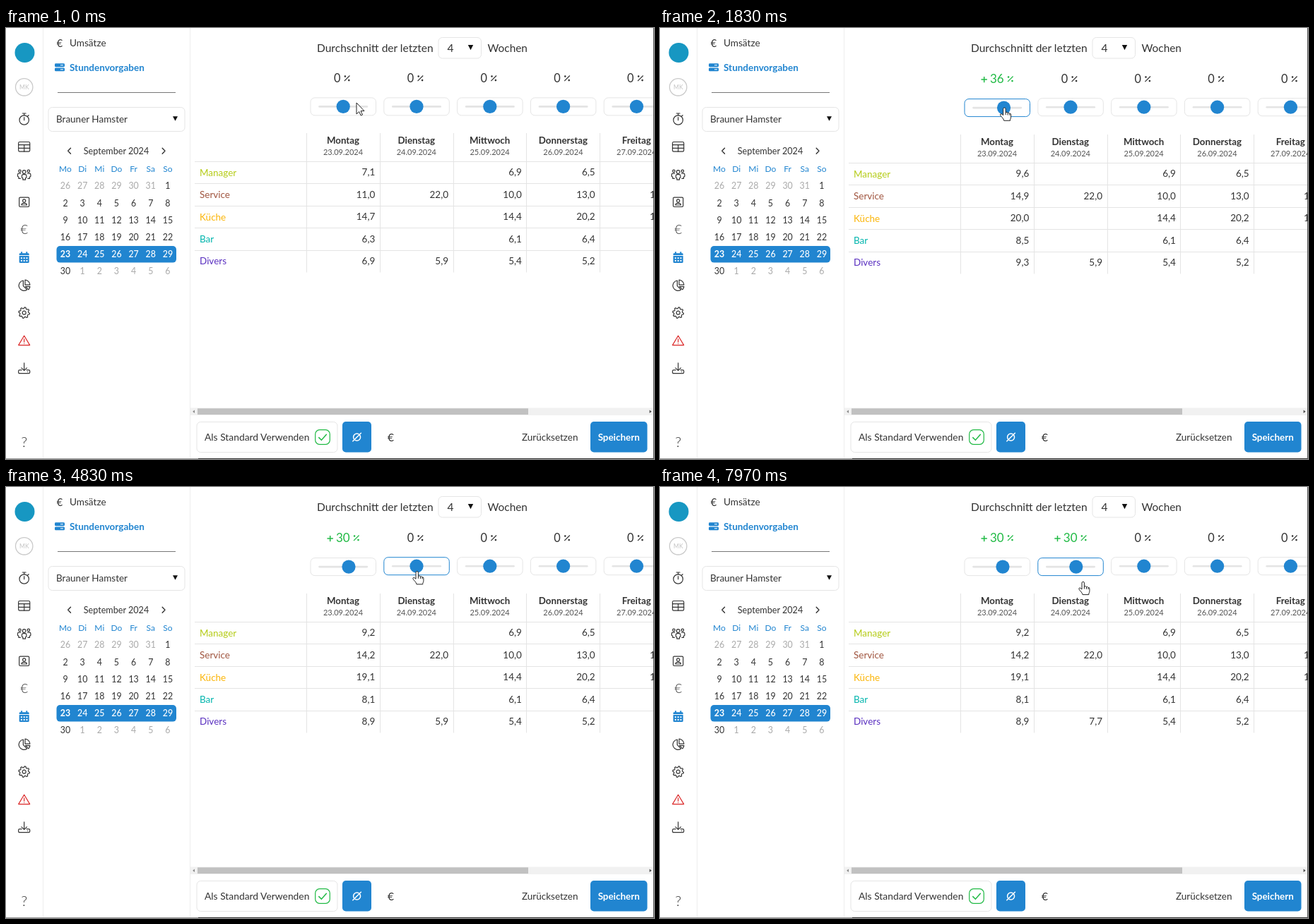
Write an HTML page that moves like this. It is 917 by 611 pixels and loops after 8 s.

```html
<!DOCTYPE html>
<html lang="de">
<head>
<meta charset="utf-8">
<title>Stundenvorgaben</title>
<style>
html, body { margin: 0; width: 100%; height: 100%; overflow: hidden; background: #fff; }
svg { display: block; }
text { font-family: Lato, "Open Sans", sans-serif; fill: #333; white-space: pre; }
.icon { fill: none; stroke: #333; stroke-width: 1.2; stroke-linecap: round; stroke-linejoin: round; }
.card { fill: #fff; stroke: #e5e5e5; }
.line { stroke: #e4e4e4; }
</style>
</head>
<body>
<svg id="stage" width="917" height="611" viewBox="0 0 917 611">
  <path class="line" d="M52.5 0V610M260.5 0V610" style="stroke:#eee"/>
  <circle cx="26.5" cy="35" r="14" fill="#1797c2"/>
  <circle cx="25.7" cy="83.8" r="12.2" fill="none" stroke="#c9c9c9" stroke-width="1.3"/>

  <g class="icon">
    <g transform="translate(25.7 129)"><circle cy="1.5" r="6.7"/><path d="M0-5.2V-8M-2.4-8H2.4M0-2.5V1.7M5-4l1.4-1.3"/></g>
    <g transform="translate(25.7 168.3)"><rect x="-8" y="-6.8" width="16" height="13.6" rx="1.6"/><path d="M-8-2.7H8M-8 2H8M0-2.7V6.8"/></g>
    <g transform="translate(25.7 208)"><circle cy="-4" r="2.3"/><circle cx="-6.2" cy="-5.2" r="1.7"/><circle cx="6.2" cy="-5.2" r="1.7"/>
      <path d="M-3.2 4V1.5Q-3.2-.3-1.5-.3H1.5Q3.2-.3 3.2 1.5V4L1.8 5V7.2H-1.8V5ZM-5-1.8H-7.5Q-9.2-1.8-9.2 0V2.2L-7.8 3.2V5.3H-5.2M5-1.8H7.5Q9.2-1.8 9.2 0V2.2L7.8 3.2V5.3H5.2"/></g>
    <g transform="translate(25.7 246.8)"><rect x="-7" y="-6.7" width="14" height="13.4" rx="1.4"/><circle cy="-1.8" r="2.1"/><path d="M-3.8 4.2Q-3.8 1.5 0 1.5T3.8 4.2Z"/></g>
    <g transform="translate(25.7 364.8)"><path d="M-1.3-6.8A7.2 7.2 0 1 0 4 6.1L-1.3.8ZM1.3-7.6A7.2 7.2 0 0 1 8.2-.7H1.3ZM1.8 1.8H8.2A7.2 7.2 0 0 1 6.2 6.1Z"/></g>
    <g transform="translate(25.7 403.7)"><circle r="2.5"/><path id="gear"/></g>
    <g transform="translate(25.7 443)" stroke="#db2828"><path d="M0-6.8L8 6.6H-8ZM0-2.2V2.2M0 4.3V4.4"/></g>
    <g transform="translate(25.7 482.5)"><path d="M0-7.6V3M-3.8-.6L0 3.2 3.8-.6M-3.5 2.4H-6.6Q-8 2.4-8 3.8V5.8Q-8 7.2-6.6 7.2H6.6Q8 7.2 8 5.8V3.8Q8 2.4 6.6 2.4H3.5M5 4.9H5.1"/></g>
    <path d="M91.5 170.3L87.7 174.3 91.5 178.3M221.2 170.3L225 174.3 221.2 178.3" style="stroke-width:1.4"/>
  </g>
  <g transform="translate(25.7 325.3)" fill="#2185d0">
    <path d="M-7-3.2V-4.6Q-7-6-5.6-6H5.6Q7-6 7-4.6V-3.2ZM-4.6-8h2v3h-2zM2.6-8h2v3h-2z"/>
    <path d="M-7-2.2H7V6.3Q7 7.8 5.6 7.8H-5.6Q-7 7.8-7 6.3Z"/>
    <path d="M-4.8 0h2v2h-2zM-1 0h2v2h-2zM2.8 0h2v2h-2zM-4.8 3.8h2v2h-2zM-1 3.8h2v2h-2zM2.8 3.8h2v2h-2z" fill="#fff"/>
  </g>
  <g fill="#2185d0"><rect x="69" y="50.3" width="14" height="4.9" rx="1.4"/><rect x="69" y="56.4" width="14" height="4.9" rx="1.4"/></g>
  <path d="M77 52.7H81M77 58.8H81" stroke="#fff"/>
  <path d="M73 91.5H240" stroke="#777"/>
  <rect class="card" x="60" y="112.5" width="193" height="34" rx="5.5"/>
  <rect class="card" x="612" y="13.5" width="60.5" height="29.5" rx="5.5"/>
  <path d="M236 125.2H243L239.5 131.8ZM653.8 24H661.2L657.5 31.2Z" fill="#111"/>
  <rect x="71.5" y="309" width="169.5" height="23.6" rx="5" fill="#2185d0"/>

  <g id="main"></g>

  <rect x="261" y="538.5" width="655" height="10.5" fill="#f1f1f1"/>
  <rect x="271" y="539.3" width="468" height="8.8" fill="#c1c1c1"/>
  <path d="M267 541.6V546L264.2 543.8Z" fill="#8a8a8a"/><path d="M910.6 541.6V546L913.6 543.8Z" fill="#444"/>
  <rect class="card" x="270" y="558.5" width="199" height="43" rx="5.5"/>
  <rect x="437.7" y="569.7" width="20.6" height="20.6" rx="6" fill="#fff" stroke="#21ba45" stroke-width="1.2"/>
  <path d="M442.8 580.6L446.4 584.2 453.4 576.2" fill="none" stroke="#21ba45" stroke-width="1.5" stroke-linecap="round"/>
  <rect x="476" y="558" width="41" height="43.5" rx="5" fill="#2185d0"/>
  <g fill="none" stroke="#fff" stroke-width="1.5" stroke-linecap="round"><circle cx="496.6" cy="580" r="5"/><path d="M490.8 585.8L502.4 574.2"/></g>
  <rect x="827" y="558" width="80.5" height="43.5" rx="5" fill="#2185d0"/>
  <g id="labels"></g>
  <path d="M0 610.5H272" stroke="#999"/><path d="M272 610.5H917" stroke="#333"/>
  <path d="M916.5 0V611" stroke="#555"/>
  <g id="cursor" fill="#fff" stroke="#222" stroke-linejoin="round">
    <path id="arrow" d="M0 0V16L3.7 12.6 6.2 18 8.5 17 6.1 11.6H11Z"/>
    <g id="hand">
      <path d="M-2 11V2A1.7 1.7 0 0 1 1.4 2V7Q3.8 6 4.4 7.6 6.4 7 7 8.5 8.9 8.1 8.9 10.3V13.5Q8.9 15.5 7.8 17V18.6H-1Q-1.4 16.2-3.6 14-5.8 12-6.2 10.4-6 8.4-4.2 9.2Z"/>
      <path d="M1.4 7V10.5M4.4 7.8V10.8M7 8.7V11" fill="none"/>
    </g>
  </g>
</svg>
<script>
const $ = id => document.getElementById(id);
const BLUE = '#2185d0', GREEN = '#21ba45', RED = '#db2828', DARK = '#333';
const LOOP = 8000, PITCH = 103.8;
const main = $('main'), labels = $('labels');

function set(node, attrs) {
  for (const k in attrs) node.setAttribute(k, attrs[k]);
  return node;
}
function add(parent, tag, attrs) {
  return parent.appendChild(set(document.createElementNS('http://www.w3.org/2000/svg', tag), attrs));
}
// y is the middle of the capital letters
function text(parent, x, y, str, size, color = DARK, anchor = 'start', weight = 400) {
  const node = add(parent, 'text', {
    x, y: y + size * 0.36, 'font-size': size, 'text-anchor': anchor, 'font-weight': weight, style: 'fill:' + color
  });
  node.textContent = str;
  return node;
}
const comma = n => n.toFixed(1).replace('.', ',');

// Sidebar and footer
let gear = '';
for (let i = 0; i < 32; i++) {
  const a = (i + 0.5) / 32 * Math.PI * 2, r = i % 4 < 2 ? 7.8 : 6;
  gear += (i ? 'L' : 'M') + (r * Math.cos(a)).toFixed(2) + ' ' + (r * Math.sin(a)).toFixed(2);
}
set($('gear'), { d: gear + 'Z' });

text(labels, 25.8, 83.8, 'MK', 8.5, '#c4c4c4', 'middle');
text(labels, 25.7, 286, '€', 18, DARK, 'middle', 300);
text(labels, 25.7, 586.6, '?', 20, DARK, 'middle', 300);
text(labels, 76, 21.5, '€', 14.5, DARK, 'middle');
text(labels, 90, 21.5, 'Umsätze', 13.6);
text(labels, 90, 56, 'Stundenvorgaben', 13.5, BLUE, 'start', 700);
text(labels, 71, 129.5, 'Brauner Hamster', 13.5);
text(labels, 156, 174.3, 'September 2024', 12.6, DARK, 'middle');
text(labels, 281, 580, 'Als Standard Verwenden', 13.85);
text(labels, 544.5, 580, '€', 15.5, DARK, 'middle');
text(labels, 730, 580, 'Zurücksetzen', 13.5);
text(labels, 867.2, 580, 'Speichern', 13.4, '#fff', 'middle', 700);
text(labels, 440, 28.3, 'Durchschnitt der letzten', 15.55);
text(labels, 629, 28.3, '4', 15.5, DARK, 'middle');
text(labels, 681.5, 28.3, 'Wochen', 15.4);

// Calendar: the grid starts on 26 August
['Mo', 'Di', 'Mi', 'Do', 'Fr', 'Sa', 'So'].forEach((d, i) =>
  text(labels, 84 + 24.15 * i, 199.8, d, 12, BLUE, 'middle'));
for (let i = 0; i < 42; i++) {
  const n = i - 5, row = Math.floor(i / 7);
  const day = n < 1 ? n + 31 : n > 30 ? n - 30 : n;
  const color = n < 1 || n > 30 ? '#aaa' : row === 4 ? '#fff' : DARK;
  const weight = n === 23 ? 700 : row === 4 ? 500 : 400;
  text(labels, 84 + 24.15 * (i % 7), 224 + 24.15 * row, day, 12.4, color, 'middle', weight);
}

// Table
const table = add(main, 'g', {});
const rows = [
  ['Manager', '#b5cc18', 7.06, '', 6.9, 6.5, ''],
  ['Service', '#a0553f', 10.96, 22, 10, 13, 14],
  ['Küche', '#fbb508', 14.7, '', 14.4, 20.2, 15],
  ['Bar', '#00b5ad', 6.26, '', 6.1, 6.4, ''],
  ['Divers', '#5a30c0', 6.86, 5.9, 5.4, 5.2, '']
];
const days = ['Montag', 'Dienstag', 'Mittwoch', 'Donnerstag', 'Freitag'];
const cells = [];
days.forEach((day, k) => {
  const cx = 477 + PITCH * k, edge = Math.round(425 + PITCH * k) + 0.5;
  add(table, 'path', { class: 'line', d: `M${edge} 149V346.5` });
  text(table, cx, 159.3, day, 13.3, DARK, 'middle', 700);
  text(table, cx, 176, `${23 + k}.09.2024`, 11, '#555', 'middle');
});
rows.forEach(([name, color, ...values], r) => {
  const y = 205 + 31.4 * r;
  add(table, 'path', { class: 'line', d: `M267 ${Math.round(y - 16) + 0.5}H917` });
  text(table, 274, y, name, 13.5, color);
  cells.push(values.map((v, k) =>
    text(table, 522.3 + PITCH * k, y - 0.5, v === '' ? '' : comma(v), 13.5, DARK, 'end')));
});

// Sliders
const sliders = days.map((_, k) => {
  const cx = 477.2 + PITCH * k, g = add(main, 'g', {});
  const label = text(g, 0, 0, '0', 17);
  const sign = add(g, 'path', { 'stroke-width': 1.5 });
  const percent = add(g, 'g', { 'stroke-width': 1.2 });
  add(percent, 'path', { d: 'M.8 3.8L8.4-3.8' });
  add(percent, 'circle', { cx: 1.9, cy: -2.8, r: 0.7 });
  add(percent, 'circle', { cx: 7.3, cy: 2.8, r: 0.7 });
  const box = add(g, 'g', {});
  const card = add(box, 'rect', { class: 'card', x: cx - 46.2, y: -12.5, width: 92.5, height: 25, rx: 6 });
  add(box, 'rect', { x: cx - 35, y: -1.3, width: 70, height: 2.6, rx: 1.3, fill: '#e4e4e4' });
  const knob = add(box, 'circle', { r: 9.6, fill: BLUE });
  return { cx, label, sign, percent, box, card, knob };
});

function drawSlider(s, value, shifted, focus) {
  const active = value !== 0, n = Math.abs(value), wide = n > 9;
  const color = value > 0 ? GREEN : value < 0 ? RED : DARK;
  const y = 71.3 + (shifted ? 1 : 0);
  const size = active ? 17 : 16.3;
  const x = s.cx + (!active ? -13.3 : wide ? -10.2 : -6.3);
  const sx = s.cx - (wide ? 18.5 : 14), half = 4.2;
  s.label.textContent = n;
  set(s.label, { x, y: y + size * 0.36, 'font-size': size, style: 'fill:' + color });
  set(s.sign, {
    stroke: color,
    d: !active ? '' : `M${sx - half} ${y + 0.8}h${2 * half}` + (value > 0 ? `M${sx} ${y + 0.8 - half}v${2 * half}` : '')
  });
  set(s.percent, {
    stroke: color, fill: color,
    transform: `translate(${s.cx + (!active ? 0.8 : wide ? 14 : 9)} ${y})`
  });
  set(s.box, { transform: `translate(0 ${111.4 + (active ? 1.7 : shifted ? 0.8 : 0)})` });
  set(s.card, { style: 'stroke:' + (focus ? BLUE : '#e5e5e5') });
  set(s.knob, { cx: s.cx + 0.26 * value });
}

// Each move: start, end, number of steps, target
const monday = [
  [770, 900, 3, -2], [1130, 1130, 1, 0], [1163, 1330, 6, 22], [1700, 1830, 5, 36],
  [2770, 2830, 2, 34], [3100, 3230, 2, 32], [3500, 3500, 1, 31], [3670, 3670, 1, 30]
];
const tuesday = [
  [5000, 5400, 13, 16], [5630, 6000, 11, 26], [6670, 6800, 2, 28], [7300, 7300, 1, 29], [7470, 7470, 1, 30]
];
const pointer = [
  [30, 300, 8, 482.5, 110], [500, 630, 5, 477.7, 112.7], [1130, 1330, 7, 484, 112.7],
  [1700, 1830, 5, 487.7, 112.7], [4170, 4830, 21, 582, 119.3], [5000, 5400, 13, 586, 119.3],
  [5630, 6000, 11, 588.5, 119.3], [7970, 7970, 1, 599, 134]
];

function progress(t, [from, to, steps]) {
  if (t < from) return 0;
  if (t >= to) return 1;
  return (Math.floor((t - from) * (steps - 1) / (to - from) + 1e-6) + 1) / steps;
}
const valueAt = (moves, t) =>
  Math.round(moves.reduce((v, m) => v + (m[3] - v) * progress(t, m), 0));

function pointerAt(t) {
  let x = 496, y = 106;
  for (const m of pointer) {
    const p = progress(t, m), e = p * p * (3 - 2 * p);
    x += (m[3] - x) * e;
    y += (m[4] - y) * e;
    if (m[0] === 4170) y += 3 * Math.sin(Math.PI * p);
  }
  return [x, y];
}

function draw(t) {
  const values = [valueAt(monday, t), valueAt(tuesday, t), 0, 0, 0];
  const shifted = values.some(v => v !== 0);
  const focus = t < 770 ? -1 : t < 4830 ? 0 : 1;
  sliders.forEach((s, k) => drawSlider(s, values[k], shifted, k === focus));
  set(table, { transform: `translate(0 ${shifted ? 2 : 0})` });
  rows.forEach((row, r) => { cells[r][0].textContent = comma(row[2] * (1 + values[0] / 100)); });
  cells[4][1].textContent = comma(rows[4][3] * (1 + values[1] / 100));

  const [x, y] = pointerAt(t);
  const plain = y < 108 || (x > 515 && x < 546);
  set($('cursor'), { transform: `translate(${x} ${y})` });
  set($('arrow'), { visibility: plain ? 'visible' : 'hidden' });
  set($('hand'), { visibility: plain ? 'hidden' : 'visible' });
}

const start = performance.now();
function tick(now) {
  draw(Math.max(0, now - start) % LOOP);
  requestAnimationFrame(tick);
}
draw(0);
requestAnimationFrame(tick);
</script>
</body>
</html>
```
